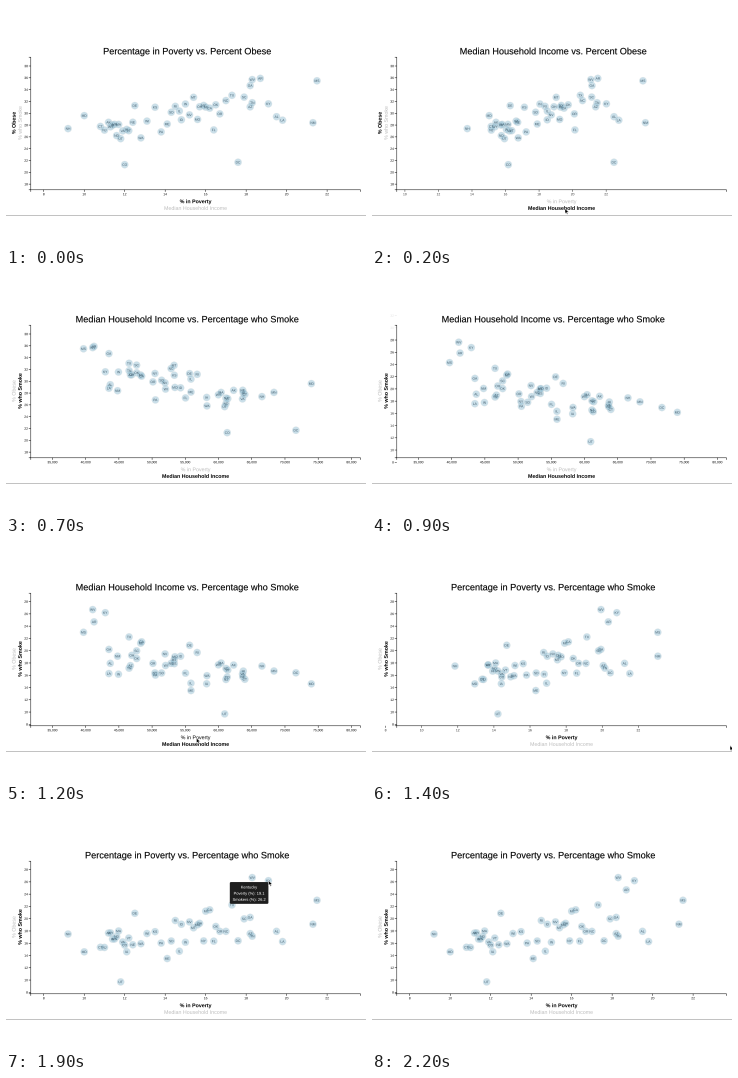
A matplotlib script that plays this animation: 360 by 240 pixels, repeating every 2400 ms.

```python
import numpy as np
import matplotlib.pyplot as plt
from functools import lru_cache
from matplotlib.animation import FuncAnimation
from matplotlib.patches import Circle, FancyBboxPatch, PathPatch, Polygon
from matplotlib.path import Path
from matplotlib.textpath import TextPath
from matplotlib.transforms import Affine2D

W, H, DPI = 360, 240, 80
FRAMES, STEP_MS = 24, 100
LEFT, RIGHT, TOP, BOTTOM = 24.8, 354.5, 51.2, 183.8
PX = 72 / DPI
BLUE, MUTED = "#8dbacf", "#bdbdbd"

# States from the lowest to the highest poverty rate.
ABBR = ("NH MD CT NJ AK WY HI MN ND MA UT VA CO IA VT NE DE WA WI KS PA ME SD "
        "RI IL ID IN NV MT MO OH NY MI CA FL OK OR NC TX DC SC AZ GA TN WV AR "
        "KY AL LA NM MS").split()
# Outliers: income, obesity, smokers.
OUTLIERS = {"NH": (66532, 27.4, 17.5), "MD": (73971, 29.6, 14.6),
            "UT": (60922, 25.7, 9.7), "CO": (61303, 21.3, 15.7),
            "DC": (71648, 21.7, 16.4), "WV": (41059, 35.7, 26.7),
            "AR": (41262, 35.9, 24.7), "KY": (42958, 31.6, 26.2),
            "NM": (44803, 28.4, 19.1), "MS": (39680, 35.5, 23.0)}


def make_states():
    """Poverty follows a curve over rank; the rest are noisy linear trends."""
    rng = np.random.default_rng(7)
    n = len(ABBR)
    poverty = np.interp(
        range(n), [0, 2, 4, 12, 16, 21, 28, 36, 41, 44, 46, 48, 49, 50],
        [9.2, 10.8, 11.2, 12, 12.5, 14.1, 15.4, 16.7, 18.2, 18.3, 19.1, 19.8,
         21.3, 21.5]).round(1)
    income = 64000 - 2500 * (poverty - 11.2) + rng.normal(0, 3800, n)
    income = income.clip(43500, 72000)
    obesity = 29.6 - (income - 54000) / 3400 + rng.normal(0, 1.9, n)
    obesity = obesity.clip(22, 35)
    smokes = 17.9 + 0.65 * (obesity - 29.4) + rng.normal(0, 1.8, n)
    smokes = smokes.clip(12.8, 24.5)
    for abbr, values in OUTLIERS.items():
        k = ABBR.index(abbr)
        income[k], obesity[k], smokes[k] = values
    return poverty, income, obesity, smokes


POVERTY, INCOME, OBESITY, SMOKES = make_states()

# Pointer path: frame, x, y.
PATH_T, PATH_X, PATH_Y = zip(
    (1, 190, 202.5), (3, 196, 202.5), (6, 13, 118), (12, 190.5, 196),
    (14, 358, 203.5), (17, 285, 110), (19, 262.5, 70.5), (21, 307, 113.5))
TIPS = {19: ("KY", "Kentucky"), 21: ("NM", "New Mexico")}
ARROW = np.array([(0, 0), (0, 5), (1.2, 4), (2, 5.8), (2.9, 5.4),
                  (2.1, 3.7), (3.7, 3.6)])

fig = plt.figure(figsize=(W / DPI, H / DPI), dpi=DPI, facecolor="white")
ax = fig.add_axes([0, 0, 1, 1])
ax.set(xlim=(0, W), ylim=(H, 0))
ax.axis("off")


def scale(data, start, end):
    lo, hi = data.min() * 0.8, data.max() * 1.1
    return lambda v: start + (v - lo) / (hi - lo) * (end - start)


pov_x, inc_x = scale(POVERTY, LEFT, RIGHT), scale(INCOME, LEFT, RIGHT)
obe_y, smo_y = scale(OBESITY, BOTTOM, TOP), scale(SMOKES, BOTTOM, TOP)
POV_TICKS, INC_TICKS = range(8, 23, 2), range(35000, 80001, 5000)
OBE_TICKS, SMO_TICKS = range(18, 39, 2), range(8, 29, 2)


def ease(t):
    t = min(max(t, 0), 1)
    return 4 * t**3 if t < 0.5 else 1 - 4 * (1 - t)**3


def mix(a, b, p):
    return a + (b - a) * p


@lru_cache(None)
def glyphs(s, size, weight):
    return TextPath((0, 0), s, size=size,
                    prop=dict(family="Liberation Sans", weight=weight))


def text(s, x, y, size, color="black", weight="normal", ha=0.5, rot=0,
         alpha=1, stroke=0.0):
    path = glyphs(s, size, weight)
    box = path.get_extents()
    place = (Affine2D().translate(-mix(box.x0, box.x1, ha), -0.36 * size)
             .scale(1, -1).rotate_deg(rot).translate(x, y))
    ax.add_patch(PathPatch(path.transformed(place), fc=color, ec=color,
                           lw=stroke * PX, alpha=alpha, snap=False))


def line(points, color="black", lw=0.5, alpha=1):
    ax.add_patch(PathPatch(Path(points), fc="none", ec=color, lw=lw * PX,
                           alpha=alpha, capstyle="butt", snap=False))


def label(s, x, y, active, hover, rot=0):
    color = "black" if active or hover else MUTED
    text(s, x, y, 5.3, color, "bold" if active else "normal", rot=rot)


def ticks(old, new, p):
    """Yield each tick value with its opacity during a change of scale."""
    for v in sorted({*old, *new}):
        yield v, (v in old) * (1 - p) + (v in new) * p


def draw_axes(px, py):
    line([(LEFT, BOTTOM + 2), (LEFT, BOTTOM), (RIGHT, BOTTOM),
          (RIGHT, BOTTOM + 2)])
    line([(LEFT - 2, BOTTOM), (LEFT, BOTTOM), (LEFT, TOP), (LEFT - 2, TOP)])
    for v, a in ticks(POV_TICKS, INC_TICKS, px):
        x = mix(pov_x(v), inc_x(v), px)
        if a > 0 and 4 < x < W:
            line([(x, BOTTOM), (x, BOTTOM + 2)], alpha=a)
            text(f"{v:,}", x, BOTTOM + 4.3, 3.3, alpha=a)
    for v, a in ticks(OBE_TICKS, SMO_TICKS, py):
        y = mix(obe_y(v), smo_y(v), py)
        if a > 0 and 40 < y < 202:
            line([(LEFT - 2, y), (LEFT, y)], alpha=a)
            text(str(v), LEFT - 3, y, 3.3, ha=1, alpha=a)


def draw_states(xs, ys):
    for x, y in zip(xs, ys):
        ax.add_patch(Circle((x, y), 3.65, fc=BLUE, ec="#e3e3e3", lw=0.35 * PX,
                            alpha=0.46))
    for s, x, y in zip(ABBR, xs, ys):
        text(s, x, y, 3.3, "#3d5a6b")


def draw_tip(abbr, name, xs, ys):
    k = ABBR.index(abbr)
    x, y = xs[k] - 38.6, ys[k] + 1.4
    ax.add_patch(FancyBboxPatch((x + 1, y + 1), 36.6, 19.8, fc="#1e1e1e",
                                ec="none",
                                boxstyle="round,pad=1,rounding_size=1.2"))
    rows = name, f"Poverty (%): {POVERTY[k]}", f"Smokers (%): {SMOKES[k]}"
    for n, row in enumerate(rows):
        text(row, x + 19.3, y + 5 + 6.2 * n, 4, "white")


def draw_pointer(i):
    if 1 <= i <= 3 or 5 <= i <= 6 or 12 <= i <= 21:
        tip = np.interp(i, PATH_T, PATH_X), np.interp(i, PATH_T, PATH_Y)
        ax.add_patch(Polygon(ARROW + tip, fc="black", ec="white",
                             lw=0.4 * PX, snap=False))


def draw(i):
    for p in list(ax.patches):
        p.remove()
    px = ease(0.35 * (i - 1)) - ease(0.35 * (i - 12))
    py = ease(0.35 * (i - 7))
    income, smoke = 2 <= i < 13, i >= 7

    line([(0, 209.5), (W, 209.5)], "#c2c2c2", 1)
    title = ("Median Household Income" if income else "Percentage in Poverty",
             "Percentage who Smoke" if smoke else "Percent Obese")
    text(" vs. ".join(title), 181.4, 45, 9.17, stroke=0.12)

    draw_axes(px, py)
    xs = mix(pov_x(POVERTY), inc_x(INCOME), px)
    ys = mix(obe_y(OBESITY), smo_y(SMOKES), py)
    draw_states(xs, ys)

    mid = (LEFT + RIGHT) / 2
    label("% in Poverty", mid, 195.3, not income, i == 12)
    label("Median Household Income", mid, 202, income, i == 1)
    label("% Obese", 7.7, 117, not smoke, False, -90)
    label("% who Smoke", 13.9, 117, smoke, i == 6, -90)

    if i in TIPS:
        draw_tip(*TIPS[i], xs, ys)
    draw_pointer(i)
    return ax.patches


anim = FuncAnimation(fig, draw, frames=FRAMES, interval=STEP_MS,
                     init_func=lambda: draw(0), repeat=True, repeat_delay=0,
                     blit=False)
plt.show()
```
